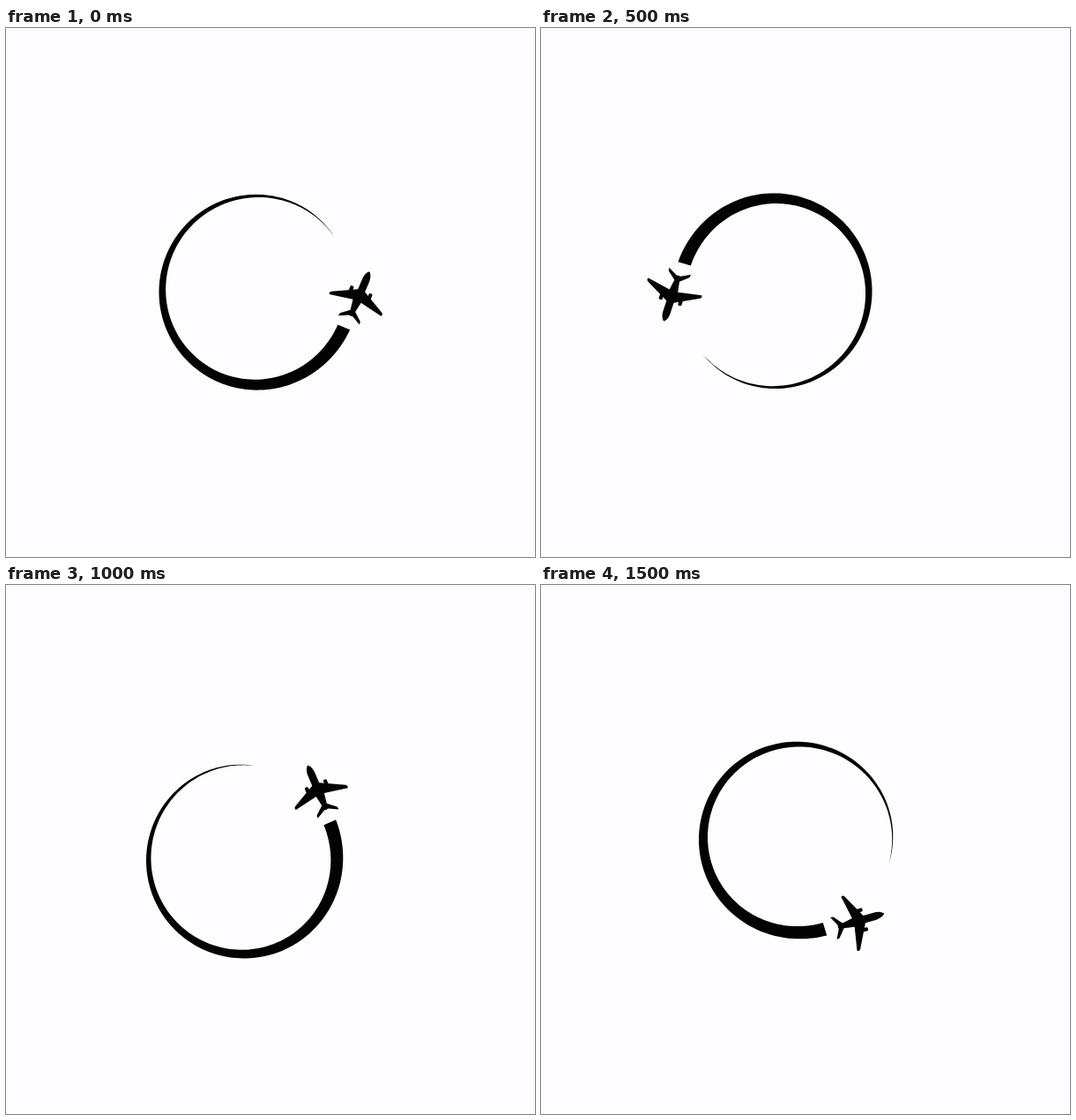
An HTML page for the animation above (1600 ms loop, 600 px wide and 600 px high).

```html
<!DOCTYPE html>
<html lang="en">
<head>
<meta charset="utf-8">
<title>Plane circling</title>
<style>
  html, body { margin: 0; height: 100%; overflow: hidden; background: #fdfcfe; }
  svg { display: block; width: 100%; height: 100%; fill: #030303; filter: blur(.6px); }
</style>
</head>
<body>
<svg viewBox="0 0 600 600">
  <defs>
    <g id="half">
      <path d="M-1-40C2-40 4.3-35 4.3-29V-17L31-3Q33.5-1 31.8 1L5-4 3 8 12.5 16 13 19.5 2.5 14H-1Z"/>
      <rect x="9.3" y="-18" width="4.2" height="10" rx="1.5"/>
    </g>
  </defs>
  <g id="ring">
    <path id="trail"/>
    <g transform="translate(112 14) rotate(23)">
      <use href="#half"/>
      <use href="#half" transform="scale(-1 1)"/>
    </g>
  </g>
</svg>
<script>
const ring = document.getElementById('ring');

// The trail runs from q = 0 behind the plane to its thin tip at q = 1.
const START = 22, SWEEP = 302, STEPS = 150;
const outer = q => 111 + 3 * (1 - 2 * q) ** 5;
const inner = q => outer(q) - 15 * (1 - q) ** 0.9;
const point = (r, q) => {
  const a = (START + SWEEP * q) * Math.PI / 180;
  return r * Math.cos(a) + ' ' + r * Math.sin(a);
};
const edge = radius => Array.from({ length: STEPS + 1 }, (_, i) => point(radius(i / STEPS), i / STEPS));
document.getElementById('trail').setAttribute('d',
  'M' + [...edge(outer), ...edge(inner).reverse()].join('L') + 'Z');

// Key poses: start time, centre, anticlockwise turn in degrees.
const poses = [
  { at: 0, x: 284.5, y: 299.5, turn: 0 },
  { at: 200, x: 270, y: 312.5, turn: 46 },
  { at: 300, x: 259.7, y: 310.8, turn: 134.3 },
  { at: 500, x: 264.5, y: 298.5, turn: 185 },
  { at: 600, x: 300, y: 284, turn: 270.3 },
  { at: 700, x: 290, y: 288.7, turn: 309.5 }
];

function draw(now) {
  const { x, y, turn } = poses.findLast(p => p.at <= now % 800);
  ring.setAttribute('transform', `translate(${x} ${y}) rotate(${-turn})`);
  requestAnimationFrame(draw);
}
draw(0);
</script>
</body>
</html>
```
